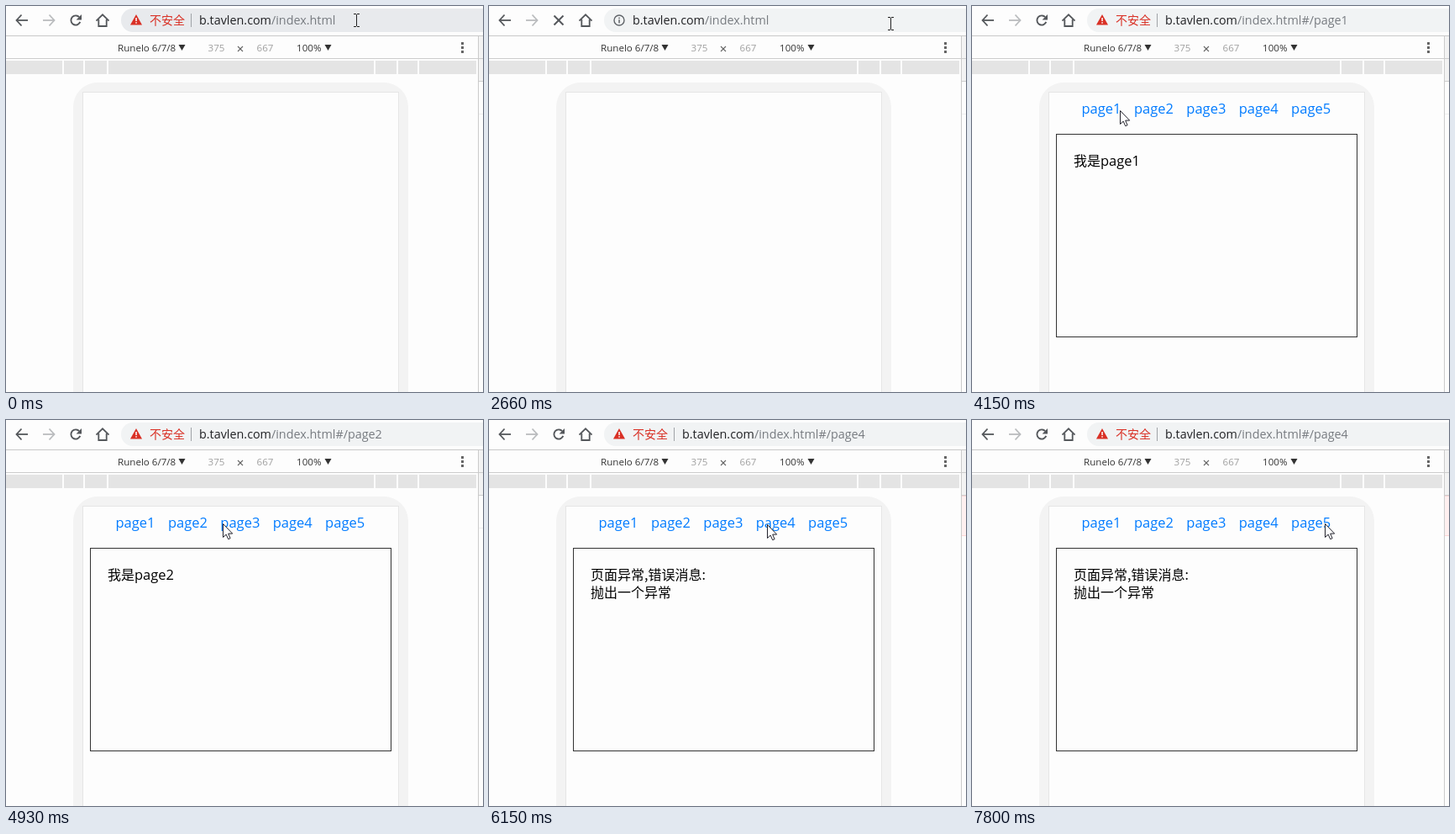
Recreate the animation shown at these times as an HTML page with a canvas. Size 568 px wide and 459 px high, loop 8 s.

```html
<!DOCTYPE html>
<html lang="zh-CN">
<head>
<meta charset="utf-8">
<title>Hash router demo</title>
<style>
html, body { margin: 0; width: 100%; height: 100%; overflow: hidden; background: #fdfdfd; }
canvas { display: block; }
</style>
</head>
<body>
<canvas id="stage" width="568" height="459"></canvas>
<script>
const ctx = document.getElementById('stage').getContext('2d');
const LOOP = 8000;
const LATIN = '"Open Sans", "Noto Sans", sans-serif';
const CJK = '"Noto Sans CJK SC", "Noto Sans CJK", sans-serif';
const HOST = 'b.tavlen.com';
const PATH = '/index.html';

// Pointer keys: time, x, y
const POINTER = [
  [0, 417, 17], [30, 417, 17], [90, 415, 17],
  [300, 415, 17], [790, 478, 21],
  [2760, 478, 21], [3300, 290, 163], [3430, 174, 133],
  [3470, 174, 133], [3700, 157, 124],
  [4020, 157, 124], [4350, 204, 125],
  [4600, 204, 125], [4930, 258, 123], [5040, 268, 124],
  [5340, 268, 124], [5780, 331, 124],
  [7370, 331, 124], [7800, 420, 123], [LOOP, 420, 123]
];

const CLICKS = [[6000, 4], [5290, 3], [4550, 2], [3980, 1]];

function rect(x, y, w, h, color) {
  ctx.fillStyle = color;
  ctx.fillRect(x, y, w, h);
}

function pill(x, y, w, h, r, color) {
  ctx.beginPath();
  ctx.roundRect(x, y, w, h, r);
  ctx.fillStyle = color;
  ctx.fill();
}

function poly(points, color, line) {
  ctx.beginPath();
  points.forEach(([x, y]) => ctx.lineTo(x, y));
  ctx.closePath();
  ctx.fillStyle = color;
  ctx.fill();
  if (line) {
    ctx.strokeStyle = line;
    ctx.lineWidth = 1;
    ctx.stroke();
  }
}

function path(points, color, width = 2) {
  ctx.beginPath();
  points.forEach(([x, y]) => ctx.lineTo(x, y));
  ctx.strokeStyle = color;
  ctx.lineWidth = width;
  ctx.stroke();
}

function text(str, x, y, size, color, family = LATIN) {
  ctx.font = size + 'px ' + family;
  ctx.fillStyle = color;
  ctx.fillText(str, x, y);
  return x + ctx.measureText(str).width;
}

function pointerAt(t) {
  const i = Math.max(1, POINTER.findIndex(k => k[0] >= t));
  const [t0, x0, y0] = POINTER[i - 1];
  const [t1, x1, y1] = POINTER[i];
  const p = (t - t0) / (t1 - t0);
  return [Math.round(x0 + (x1 - x0) * p), Math.round(y0 + (y1 - y0) * p)];
}

function stateAt(t) {
  const click = CLICKS.find(c => t >= c[0]);
  const page = click ? click[1] : 0;
  return {
    page,
    hover: t < 240,
    focus: t >= 240 && t < 2660,
    selected: t >= 270 && t < 2660,
    loading: t >= 2660 && t < 2860,
    secureHint: t >= 2660 && t < 2800,
    ready: t >= 2860,
    view: page === 4 && t < 6060 ? 3 : page,
    failed: t >= 6090
  };
}

function arrowIcon(x, dir, color) {
  path([[x - 6.5 * dir, 17], [x + 7 * dir, 17]], color, 1.8);
  path([[x + 0.5 * -dir, 10.5], [x - 6.5 * dir, 17], [x - 0.5 * dir, 23.5]], color, 1.8);
}

function reloadIcon() {
  ctx.beginPath();
  ctx.arc(83, 17, 5.6, 0.35, Math.PI * 1.76);
  ctx.strokeStyle = '#54575b';
  ctx.lineWidth = 1.9;
  ctx.stroke();
  poly([[90, 10], [90, 16.4], [83.6, 16.4]], '#54575b');
}

function navIcons(loading) {
  const ink = '#54575b';
  arrowIcon(19, 1, ink);
  arrowIcon(51, -1, '#babcbe');
  if (loading) {
    path([[77.5, 11.5], [88.5, 22.5]], ink);
    path([[88.5, 11.5], [77.5, 22.5]], ink);
  } else {
    reloadIcon();
  }
  path([[107.5, 17.6], [115, 10.3], [122.5, 17.6]], ink, 1.8);
  path([[110.3, 16], [110.3, 24], [119.7, 24], [119.7, 16]], ink, 1.8);
}

function warning() {
  poly([[155, 10], [162, 22.5], [148, 22.5]], '#d93025');
  rect(154.3, 14, 1.5, 4, '#fff');
  rect(154.3, 19.2, 1.5, 1.5, '#fff');
  text('不安全', 171, 22, 14, '#d93025', CJK);
  rect(220, 9, 1, 16, '#a0a3a7');
}

function infoIcon() {
  ctx.beginPath();
  ctx.arc(155, 17, 6, 0, Math.PI * 2);
  ctx.strokeStyle = '#5f6368';
  ctx.lineWidth = 1.4;
  ctx.stroke();
  rect(154.3, 13.6, 1.5, 1.5, '#5f6368');
  rect(154.3, 16.2, 1.5, 4.2, '#5f6368');
}

function addressBar(s) {
  if (s.focus) {
    pill(136, 2, 460, 30, 15, '#a8c7fa');
    pill(138, 4, 456, 26, 13, '#fff');
  } else {
    pill(137, 3, 460, 28, 14, s.hover ? '#e8eaed' : '#f1f3f4');
  }
  if (s.secureHint) infoIcon();
  else warning();

  const x = s.secureHint ? 171 : 230;
  if (s.selected) rect(230, 8, 162, 19, '#3390ff');
  const end = text(HOST, x, 22, 14.35, s.selected ? '#fff' : '#202124');
  const tail = PATH + (s.page ? '#/page' + s.page : '');
  text(tail, end, 22, 14.35, s.selected ? '#fff' : '#777b80');
}

function deviceBar() {
  rect(0, 35, 568, 1, '#c8c8c8');
  rect(0, 62, 562, 1, '#cdcdcd');
  text('Runelo 6/7/8', 133, 54, 11.6, '#333');
  text('375', 240.5, 54, 11.6, '#a0a0a0');
  text('667', 298.5, 54, 11.6, '#a0a0a0');
  text('100%', 346, 54, 11.6, '#333');
  path([[276, 48], [282, 54]], '#666', 1.1);
  path([[282, 48], [276, 54]], '#666', 1.1);
  for (const x of [209.5, 383.5]) poly([[x - 4, 46], [x + 4, 46], [x, 53]], '#333');
  for (const y of [43, 48, 53]) rect(542, y, 3, 3, '#666');

  rect(0, 65, 560, 16, '#e4e4e4');
  for (const x of [67, 92, 120, 438, 465, 490]) rect(x, 65, 2, 16, '#fdfdfd');
}

function sidePanel(failed) {
  rect(563, 36, 5, 53, '#f3f3f3');
  rect(563, 62, 5, 1, '#cdcdcd');
  rect(563, 89, 5, 1, '#cdcdcd');
  if (failed) {
    rect(563, 90, 5, 48, '#ffd6d6');
    rect(563, 91, 5, 46, '#fff0f0');
  } else {
    rect(563, 128, 5, 1, '#f0f0f0');
  }
  rect(562, 36, 1, 423, '#cbcbcb');
}

function phone(s) {
  pill(80, 91, 399, 420, 29, '#f3f3f3');
  rect(91, 102, 377, 357, '#e6e6e6');
  rect(92, 103, 375, 356, '#fdfdfd');
  if (!s.ready) return;

  for (let i = 0; i < 5; i++) text('page' + (i + 1), 130.5 + i * 62.4, 128, 16.5, '#007bff');
  ctx.strokeStyle = '#333';
  ctx.lineWidth = 1;
  ctx.strokeRect(100.5, 152.5, 358, 241);

  if (s.view === 4) {
    text('页面异常,错误消息:'.replace(',', ',').replace(':', ':'), 121, 190, 16, '#000', CJK);
    text('抛出一个异常', 121, 211, 16, '#000', CJK);
  } else if (s.view) {
    const end = text('我是', 121, 190, 16, '#000', CJK);
    text('page' + s.view, end, 190, 16.5, '#000');
  } else {
    text('我是首页', 121, 190, 16, '#000', CJK);
  }
}

function pointer(x, y) {
  if (y < 32) {
    rect(x, y - 7, 1, 14, '#222');
    for (const dy of [-8, 7]) {
      rect(x - 3, y + dy, 3, 1, '#222');
      rect(x + 1, y + dy, 3, 1, '#222');
    }
    return;
  }
  const shape = [[0, 0], [0, 16], [3.7, 12.6], [6.2, 18.2], [8.6, 17.2], [6.2, 11.6], [11.2, 11.6]];
  poly(shape.map(([dx, dy]) => [x + 0.5 + dx, y + 0.5 + dy]), '#fff', '#22222c');
}

function draw(t) {
  const s = stateAt(t);
  rect(0, 0, 568, 459, '#fdfdfd');
  navIcons(s.loading);
  addressBar(s);
  deviceBar();
  phone(s);
  sidePanel(s.failed);
  pointer(...pointerAt(t));
}

const start = performance.now();
function tick() {
  draw((performance.now() - start) % LOOP);
  requestAnimationFrame(tick);
}
draw(0);
requestAnimationFrame(tick);
</script>
</body>
</html>
```
